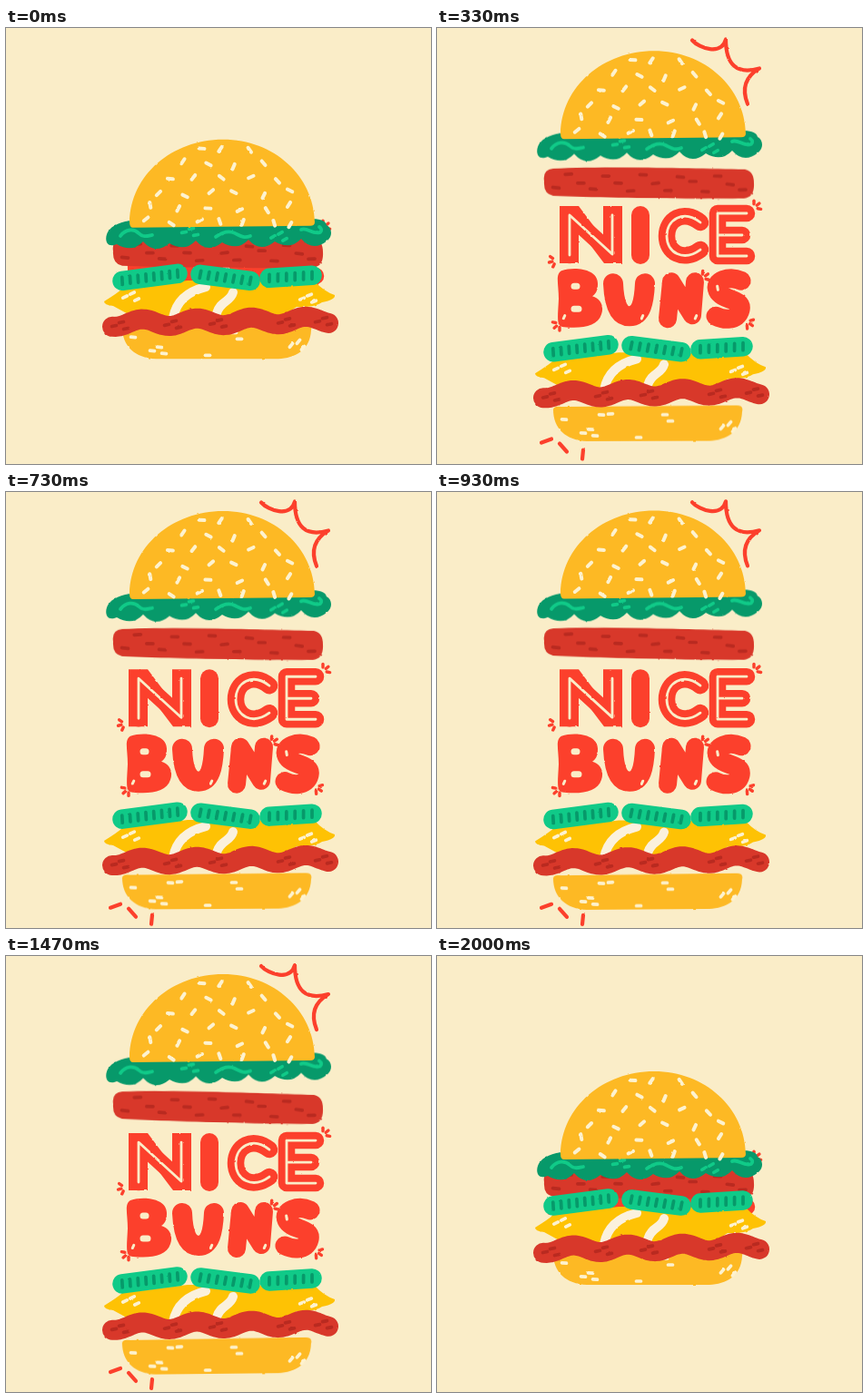
An HTML page for the animation above (4510 ms loop, 468 by 480 pixels).

```html
<!DOCTYPE html>
<html lang="en">
<head>
<meta charset="utf-8">
<title>Nice Buns</title>
<style>
  html, body { margin: 0; width: 100%; height: 100%; overflow: hidden; background: #faedc8; }
  svg { display: block; width: 100%; height: 100%; }
  path { fill: none; stroke-linecap: round; stroke-linejoin: round; }
</style>
</head>
<body>
<svg id="stage" viewBox="0 0 468 480" role="img" aria-label="Nice Buns">
  <defs>
    <filter id="rough" filterUnits="userSpaceOnUse" x="0" y="0" width="468" height="480" color-interpolation-filters="sRGB">
      <feTurbulence type="fractalNoise" baseFrequency=".16" numOctaves="2" seed="4"/>
      <feDisplacementMap in="SourceGraphic" scale="1.8" xChannelSelector="R" yChannelSelector="G"/>
    </filter>
  </defs>
</svg>
<script>
const BUN = '#fdb924', CREAM = '#fdf2cf', PAPER = '#faedc8', LEAF = '#07996a', LIME = '#10ca88';
const MEAT = '#d8382a', DARK = '#b92a20', CHEESE = '#fec204', ONION = '#fbf1dd', RED = '#fc402c';

const range = n => Array.from({ length: n }, (_, i) => i);
const clamp = x => Math.max(0, Math.min(1, x));

let seed = 7;
const random = () => (seed = seed * 16807 % 2147483647) / 2147483647;
const jitter = size => (random() - .5) * size;

const fill = (color, d) => `<path d="${d}" style="fill:${color}"/>`;
const line = (color, width, d, extra = '') =>
  `<path d="${d}" stroke="${color}" stroke-width="${width}" ${extra}/>`;

function dash(color, x, y, angle, length = 5, width = 3.7) {
  const r = angle * Math.PI / 180, dx = Math.cos(r) * length, dy = Math.sin(r) * length;
  return line(color, width, `M${x - dx / 2} ${y - dy / 2}l${dx} ${dy}`);
}

// Three dashes in a loose triangle
const trio = (color, x, y, angle = 0) =>
  dash(color, x - 7, y, angle) + dash(color, x + 1, y - 4, angle) + dash(color, x + 6, y + 3, angle);

// Three short rays fanning out around a direction
const burst = (x, y, direction) => [-50, 0, 50].map(turn => {
  const a = direction + turn, r = a * Math.PI / 180;
  return dash(RED, x + 6 * Math.cos(r), y + 6 * Math.sin(r), a, 3.5, 3.4);
}).join('');

function pickle(x1, y1, x2, y2, count) {
  const tilt = Math.atan2(y2 - y1, x2 - x1) * 180 / Math.PI;
  return line(LIME, 21.5, `M${x1} ${y1}L${x2} ${y2}`) + range(count).map(i => {
    const k = i / (count - 1);
    return dash(LEAF, x1 + (x2 - x1) * k, y1 + (y2 - y1) * k, tilt + 94, 8);
  }).join('');
}

// Alternating rows of seeds, as wide as the dome allows
function domeSeeds() {
  let art = '';
  for (let row = 0; row < 6; row++) {
    const y = 31 + row * 16, half = 102 * Math.sqrt(1 - ((114 - y) / 94) ** 2) - 9;
    const count = Math.round(half / 14);
    for (const i of range(count)) {
      const x = 238 + half * (2 * (i + .5) / count - 1);
      art += dash(CREAM, x + jitter(10), y + jitter(7), (i + row) % 2 ? -45 + jitter(50) : 35 + jitter(90), 6, 4);
    }
  }
  return art;
}

const bottomBun =
  fill(BUN, 'M128 425Q129 421 136 422L330 421Q338 421 336 428C335 451 318 459 300 460L165 460C142 459 128 446 128 425Z') +
  dash(CREAM, 140, 436, 5) + trio(CREAM, 168, 451, 5) + dash(CREAM, 181, 431, 5) + dash(CREAM, 191, 430, -5) +
  dash(CREAM, 222, 456, 0) + dash(CREAM, 257, 438, 0) + dash(CREAM, 251, 431, 0) + trio(CREAM, 321, 445, -50);

const outlines = 'M146 249V205L193 248V205M290 213C271 198 253 210 253 228C253 246 271 257 290 243' +
  'M341 203H309V250H341M309 227H336';
const nice =
  fill(RED, 'M135 195H156L183 231V195H204V258H184L156 221V258H135Z') +
  line(RED, 18.5, outlines) + line(RED, 20, 'M224 205V249') + line(PAPER, 2.8, outlines) +
  burst(349, 197, -40) + burst(131, 255, 165);

const buns =
  fill(RED, 'M137 269C152 264 178 267 177 284C177 292 174 295 171 297C181 300 184 309 181 317C177 330 160 333 140 331C131 331 133 322 134 300C134 284 130 273 137 269Z') +
  line(RED, 22, 'M194 283C195 306 200 319 212 319C225 319 228 303 229 283') +
  line(RED, 20, 'M254 322L258 281L281 318L284 281') +
  line(RED, 21, 'M335 280C322 274 304 280 309 291C314 302 337 299 334 312C331 325 315 323 307 319') +
  line(PAPER, 7, 'M151 286h3M151 311h5') +
  [140, 226, 285].map(x => dash(PAPER, x, 320, -65, 3.5, 3)).join('') + dash(PAPER, 309, 288, 80, 4, 3) +
  burst(135, 327, 140) + burst(341, 325, 35) + burst(292, 277, -35);

const patty =
  fill(MEAT, 'M128 151C180 148 280 150 339 151Q349 153 349 166Q350 182 338 183C280 184 180 183 128 181Q117 179 118 165Q116 152 128 151Z') +
  range(16).map(i => dash(DARK, 131 + i * 13.7, 166 + [8, -8, 0][i % 3] + jitter(4), jitter(16), 7)).join('');

const cheese =
  fill(CHEESE, 'M108 385Q124 375 128 371L200 362L340 363Q350 374 362 378Q363 383 348 386Q340 392 320 391L300 404L140 402L118 390Q108 389 108 385Z') +
  line(ONION, 10, 'M220 369C203 373 188 382 184 403M250 375C247 386 236 384 232 398') +
  trio(CREAM, 138, 380, -25) + trio(CREAM, 333, 382, -20);

const bacon =
  line(MEAT, 22, 'M' + range(61).map(i => {
    const x = 117 + i * 238 / 60;
    return `${x} ${408 - i * .06 - 4 * Math.cos((x - 150) * Math.PI / 30)}`;
  }).join('L')) +
  [126, 184, 234, 309, 350].map((x, i) => trio(DARK, x, 411 - i * 1.2, -12)).join('');

const pickles = pickle(128, 361, 189, 353, 8) + pickle(214, 354, 269, 361, 7) + pickle(290, 358, 337, 355, 6);

const lettuce =
  fill(LEAF, 'M114 120C120 113 132 110 146 109L330 109C342 107 352 109 353 115C359 118 360 127 354 132' +
    range(8).map(i => `q${i % 2 ? -12 : -16} 13 -29 ${i % 2 ? 3 : -2}`).join('') + 'C108 142 108 126 114 120Z') +
  line(LIME, 3.8, 'M126 127C132 119 141 119 146 124S156 127 161 126M231 128C238 123 246 121 252 124S262 130 269 127M325 120C332 117 337 126 346 123Q349 120 345 117') +
  trio(LIME, 203, 123, -10) + trio(LIME, 301, 128, -30);

const topBun =
  fill(BUN, 'M136 111C137 59 183 20 239 20S339 60 340 111Q340 115 335 115L140 117Q136 117 136 111Z') + domeSeeds();

const trim = 'class="ray" pathLength="1"';
const topRays = line(RED, 4.2, 'M281 11C289 20 313 28 318 10C318 38 330 49 355 42C338 52 336 66 342 81', trim);
const lowRays = ['M126 454L115 458', 'M135 459L143 468', 'M161 466L160 476'].map(d => line(RED, 4.2, d, trim)).join('');

// Drawn open; drop is the offset when stacked, lead is in steps, tilt in degrees about y
const layers = [
  { art: topRays, drop: 50 },
  { art: lowRays, drop: -30 },
  { art: bottomBun, drop: -98, lead: -.25, tilt: -.6, y: 440 },
  { art: nice, drop: 26, lead: .9 },
  { art: buns, drop: -35 },
  { art: patty, drop: 84, tilt: 1, y: 166 },
  { art: cheese, drop: -86, lead: -.25 },
  { art: bacon, drop: -85, lead: -.25 },
  { art: pickles, drop: -86 },
  { art: lettuce, drop: 106, tilt: -.9, y: 126 },
  { art: topBun, drop: 107 }
];

const stage = document.getElementById('stage');
for (const layer of layers) {
  layer.node = document.createElementNS('http://www.w3.org/2000/svg', 'g');
  layer.node.innerHTML = `<g filter="url(#rough)">${layer.art}</g>`;
  stage.append(layer.node);
}
const rays = document.querySelectorAll('.ray');

const LOOP = 4510, STEP = 100 / 3, LAST = 60;

// 1 is stacked, 0 is open: a quick lift with a slow tail, then a sudden drop
function stacked(step, lead) {
  const u = Math.max(0, step + 1 + lead);
  const lift = .9 * Math.exp(-((u / 5.5) ** 2)) + .1 * Math.exp(-u / 10);
  const fall = Math.exp(-(((LAST - step) / 2) ** 2));
  return Math.min(1, lift + fall);
}

function draw(time) {
  // Steps fall on 10 ms marks
  const step = Math.min(LAST, Math.floor((Math.floor(time / 10) * 10 + 5) / STEP));
  for (const { node, drop, lead = 0, tilt = 0, y = 0 } of layers) {
    const closed = stacked(step, lead);
    const angle = tilt * clamp(step / 40) * (1 - closed);
    node.setAttribute('transform', `translate(0 ${drop * closed}) rotate(${angle} 234 ${y})`);
  }
  const shown = clamp((step - 5) / 4) * clamp((54 - step) / 5);
  for (const ray of rays) {
    ray.style.visibility = shown > 0 ? 'visible' : 'hidden';
    ray.setAttribute('stroke-dasharray', `${shown} 2`);
  }
}

const start = performance.now();
function tick() {
  draw((performance.now() - start) % LOOP);
  requestAnimationFrame(tick);
}
draw(0);
requestAnimationFrame(tick);
</script>
</body>
</html>
```
